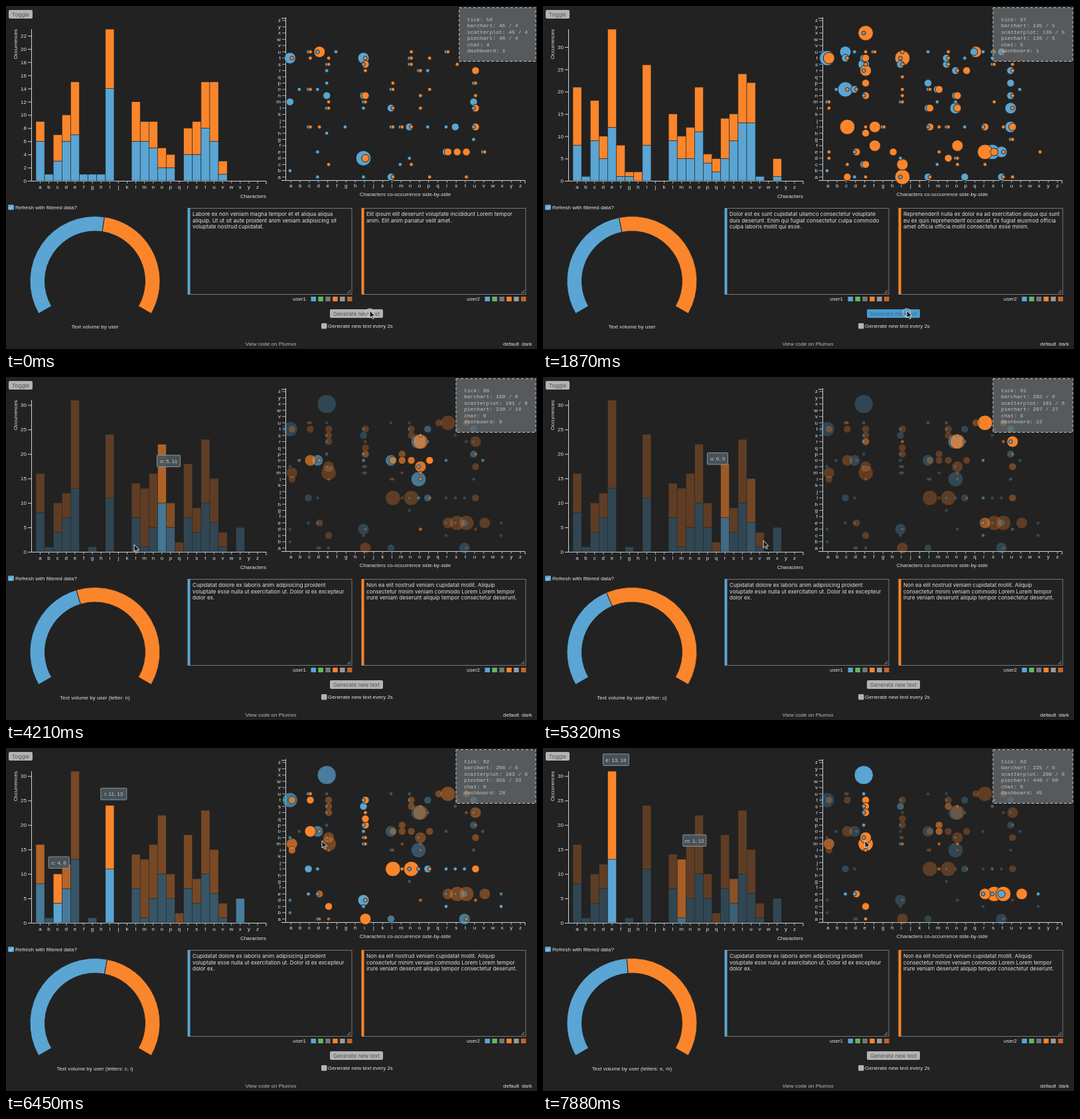
Recreate the animation shown at these times as an HTML page. Size 800 by 518 pixels, loop 8 s.

```html
<!DOCTYPE html>
<html lang="en">
<head>
<meta charset="utf-8">
<title>Text dashboard</title>
<style>
html, body { margin: 0; width: 100%; height: 100%; overflow: hidden; background: #222; }
svg { display: block; width: 800px; height: 518px; }
text { font: 8px "Liberation Sans", Arial, sans-serif; fill: #e2e2e2; white-space: pre; }
.wide { font: 8.1px Inter, sans-serif; }
.mono { font: 8px "Liberation Mono", monospace; fill: #c4c4c4; }
.mid { text-anchor: middle; }
.end { text-anchor: end; }
.axis { fill: none; stroke: #ccd3d6; }
</style>
</head>
<body>
<svg viewBox="0 0 800 518"><g id="still"></g><g id="live"></g></svg>
<script>
const LOOP = 8000, FADE = 750, DIM = 0.28;
const BG = '#222', COLORS = ['#5aa5d3', '#fb852b'];
const LETTERS = [...'abcdefghijklmnopqrstuvwxyz'];

const mix = (a, b, k) => a + (b - a) * k;
const ease = u => u <= 0 ? 0 : u >= 1 ? 1 : u < .5 ? 4 * u ** 3 : 1 - 4 * (1 - u) ** 3;
const index = letter => letter.charCodeAt(0) - 97;

// Value of interruptible eased transitions; only a new target restarts the ease.
function track(events, t, get) {
  let from = get(events[0]), to = from, start = events[0][0];
  for (const e of events) {
    if (e[0] > t) break;
    const next = get(e);
    if (next === to) continue;
    from = mix(from, to, ease((e[0] - start) / FADE));
    to = next;
    start = e[0];
  }
  return mix(from, to, ease((t - start) / FADE));
}

// Linear interpolation through [time, value, value...] points.
function along(points, t, col = 1) {
  const i = points.findIndex(p => p[0] > t);
  if (i < 0) return points[points.length - 1][col];
  if (!i) return points[0][col];
  const a = points[i - 1], b = points[i];
  return mix(a[col], b[col], (t - a[0]) / (b[0] - a[0]));
}

const text = (x, y, s, cls = '', more = '') => `<text x="${x}" y="${y}" class="${cls}" ${more}>${s}</text>`;
const rect = (x, y, w, h, fill, more = '') =>
  `<rect x="${x}" y="${y}" width="${w}" height="${h}" fill="${fill}" ${more}/>`;
const line = (d, more = '') => `<path class="axis" d="${d}" ${more}/>`;

// ---- data ----
const CHATS = [
  ['Labore ex non veniam magna tempor et et aliqua aliqua|aliquip. Ut ut sit aute proident anim veniam adipisicing sit|voluptate nostrud cupidatat.',
   'Elit ipsum elit deserunt voluptate incididunt Lorem tempor|anim. Elit anim pariatur velit amet.'],
  ['Dolor est ex sunt cupidatat ullamco consectetur voluptate|duis deserunt. Enim qui fugiat consectetur culpa commodo|culpa laboris mollit qui esse.',
   'Reprehenderit nulla ex dolor ea ad exercitation aliqua qui sunt|eu ex quis reprehenderit occaecat. Ex fugiat eiusmod officia|amet officia officia mollit consectetur esse minim.'],
  ['Cupidatat dolore ex laboris anim adipisicing proident|voluptate esse nulla ut exercitation ut. Dolor id ex excepteur|dolor ex.',
   'Non ea elit nostrud veniam cupidatat mollit. Aliquip|consectetur minim veniam commodo Lorem Lorem tempor|irure veniam deserunt aliquip tempor consectetur deserunt.'],
];

const add = (table, key) => { table[key] = (table[key] || 0) + 1; };
const parse = (s, size) => Object.fromEntries(
  s.split(' ').map(k => [k.slice(0, size), +k.slice(size) || 1]));

function analyse(chat) {
  const bars = [{}, {}], pairs = [{}, {}];
  chat.forEach((s, user) => {
    for (const word of s.toLowerCase().match(/[a-z]+/g))
      [...word].forEach((c, i) => {
        add(bars[user], c);
        if (i) add(pairs[user], word[i - 1] + c);
      });
  });
  return { bars, pairs };
}

const before = {
  bars: [
    parse('a6 b c3 d6 e7 f g h i14 l6 m6 n5 o2 p2 r4 s4 t8 u6 v', 1),
    parse('a3 c4 d4 e8 i9 l6 m3 n4 o3 p2 r4 s5 t7 u9 v2', 1)],
  pairs: [
    parse('ab am2 at3 bo ci co cu da de do du eh en2 ep er es el fu gi id4 ia il im in2 is it3 la2 ll2 li lo mc mi nd ni2 ns nt or pi pr re2 ri ru si2 ug ui ul um2 up ve', 2),
    parse('at ci co cu ct di du3 ec el em et es id2 in2 im ir is2 it la li ll lo lp mi nc ni nt ns nu or on ol pa po pt re2 ru se2 ss ta te2 ui2 ul2 un up ur2 ve', 2)],
};
const sets = [before, ...CHATS.map(analyse)];
const count = (set, user, letters) => [...letters].reduce((n, c) => n + (set.bars[user][c] || 0), 0);
const share = (set, letters = LETTERS) => {
  const a = count(set, 0, letters);
  return a / (a + count(set, 1, letters));
};
for (const s of sets) {
  s.max = Math.max(...LETTERS.map(c => count(s, 0, c) + count(s, 1, c)));
  s.step = s.max > 25 ? 5 : 2;
}
const last = sets[3];
const dots = [0, 1].flatMap(user =>
  [...new Set(sets.flatMap(s => Object.keys(s.pairs[user])))].map(pair => ({ user, pair })));

// ---- timeline ----
const updates = [0, 100, 1040, 2080].map((t, i) => [t, sets[i]]);

// [time, hovered letters, letters lit when they differ]
const hovers = [
  [0, ''], [3050, 'p'], [3750, 'o'], [4130, 'n'],
  [4250, 'l'], [4450, 'i'], [4560, 'l'], [4610, 'm'], [4660, 'o'], [4720, 'r'], [5080, 'u'],
  [5420, 'v'], [5490, 'x'], [5560, ''], [5985, 'ci', 'ciadx'], [6100, 'ci'],
  [6560, 'et'], [6780, 'ex'], [6950, 'eu'], [7140, 'es'], [7515, 'em'],
].map(([t, letters, lit = letters]) => [t, letters, lit]);

const pie = [
  ...updates.map(([t, set]) => [t, share(set)]),
  ...[[4150, 'n'], [4350, 'l'], [4750, 'u'], [5480, 'x'],
      [5985, 'ci'], [6480, 'ex'], [7660, 'em']].map(([t, s]) => [t, share(last, s)]),
];

const pointer = [
  [0, 548, 460], [2120, 548, 460], [2850, 478, 379], [3080, 300, 225], [3400, 247, 225],
  [3800, 234, 235], [4090, 222, 245], [4210, 193, 253], [4450, 158, 240], [4560, 185, 238],
  [4720, 265, 235], [5050, 285, 240], [5320, 332, 247], [5500, 352, 245], [5700, 400, 220],
  [5985, 456, 183], [6250, 458, 180], [6450, 476, 140], [6600, 485, 78], [6850, 486, 50],
  [7000, 486, 70], [7200, 486, 88], [7450, 485, 135], [7880, 485, 140],
];
const frames = [[100, 45], [860, 90], [1040, 90], [1800, 135], [2080, 135], [2830, 181]];
const dashboard = [[3050, 1], [4210, 9], [5320, 22], [6450, 28], [7880, 45]];
const scatterExtra = [[5900, 0], [6450, 2], [7880, 19]];
const pieExtra = [[3050, 0], [4210, 48], [5320, 115], [6450, 173], [7880, 258]];

// ---- layout ----
const BASE = 264, TOP = 35, HEIGHT = BASE - TOP;
const barX = c => 45 + 13.1 * index(c);
const dotX = c => 429.3 + 13.83 * index(c);
const dotY = c => 258.2 - 9.45 * index(c);

function drawStill() {
  let s = line(`M38.5 35V264.5H392V269`);
  s += line('M421.5 17V263.5H782V268M415 18.5H421M415 263.5H421');
  for (const c of LETTERS) {
    const x = barX(c) + 6.5;
    s += line(`M${x} 264V268M${dotX(c)} 263V267M416 ${dotY(c)}H421`, 'stroke-width=".8"');
    s += text(x, 276, c, 'mid') + text(dotX(c), 274, c, 'mid') + text(414, dotY(c) + 2.5, c, 'end');
  }
  s += text(17, 35, 'Occurrences', 'end', 'transform="rotate(-90 17 35)"');
  s += text(392, 290, 'Characters', 'end') + text(601.5, 287, 'Characters co-occurrence side-by-side', 'mid');
  s += rect(4, 6, 36, 13, '#b3b3b3', 'rx="2"') + text(22, 15.5, 'Toggle', 'wide mid', 'style="fill:#555"');
  s += rect(3, 300, 9, 8, COLORS[0], 'rx="1.5"') + line('M5 304L7 306L10.3 302', 'stroke-width="1.1"');
  s += text(14, 307, 'Refresh with filtered data?');
  s += rect(475, 479, 8.5, 8.5, '#b3b3b3', 'rx="1.5"') + text(485, 486, 'Generate new text every 2s');
  s += text(399, 513, 'View code on Plumvo', 'mid', 'style="fill:#bbb"');
  s += text(749, 513, 'default') + text(777, 513, 'dark');
  COLORS.forEach((color, user) => {
    const x = 274 + 262 * user;
    s += rect(x + .5, 305.5, 246.5, 130, 'none', 'stroke="#777"') + rect(x - .5, 305, 4, 130.5, color);
    s += line(`M${x + 240} 434L${x + 245} 429M${x + 243} 434L${x + 245} 432`, 'stroke-width=".7"');
    s += text(x + 178, 445, 'user' + (user + 1), 'end');
    [COLORS[0], '#5dba62', '#777', COLORS[1], '#999', '#c4642a'].forEach((fill, i) => {
      s += rect(x + 185.5 + 10.9 * i, 439, 7.5, 7, fill);
    });
  });
  return s;
}

function drawBars(t) {
  const max = track(updates, t, e => e[1].max);
  const y = v => BASE - HEIGHT * v / max;
  let s = '';
  for (let v = 0; v <= 35; v++) {
    const show = track(updates, t, ([, d]) => +(v <= d.max && v % d.step === 0));
    if (show > .01) s += `<g opacity="${show}">${line(`M33 ${y(v) + .5}H38`)}${text(31, y(v) + 3, v, 'end')}</g>`;
  }
  for (const c of LETTERS) {
    const [a, b] = [0, 1].map(u => track(updates, t, e => e[1].bars[u][c] || 0));
    const lit = track(hovers, t, e => !e[2] || e[2].includes(c) ? 1 : DIM);
    const more = `opacity="${lit}" stroke="${BG}" stroke-width=".6"`;
    if (a > 0) s += rect(barX(c), y(a), 13.1, BASE - y(a), COLORS[0], more);
    if (b > 0) s += rect(barX(c), y(a + b), 13.1, y(a) - y(a + b), COLORS[1], more);
  }
  return s;
}

function drawDots(t) {
  return dots
    .map(d => ({ ...d, r: 2.85 * track(updates, t, e => e[1].pairs[d.user][d.pair] || 0) }))
    .filter(d => d.r > .05)
    .sort((a, b) => b.r - a.r)
    .map(({ user, pair, r }) => {
      const lit = track(hovers, t, e => !e[2] || [...pair].some(c => e[2].includes(c)) ? 1 : DIM);
      const x = dotX(pair[0]) + (user ? 1.5 : -1.4);
      return `<circle cx="${x}" cy="${dotY(pair[1])}" r="${r}" fill="${COLORS[user]}" stroke="${BG}" opacity="${lit}"/>`;
    }).join('');
}

function drawPie(t, letters) {
  const split = 240 * track(pie, t, e => e[1]) - 120;
  const at = (r, deg) => {
    const a = deg * Math.PI / 180;
    return `${134 + r * Math.sin(a)} ${415.5 - r * Math.cos(a)}`;
  };
  const arc = (a, b, fill) => {
    const big = +(b - a > 180);
    return `<path fill="${fill}" stroke="${BG}" d="M${at(98, a)}A98 98 0 ${big} 1 ${at(98, b)}L${at(75.5, b)}A75.5 75.5 0 ${big} 0 ${at(75.5, a)}Z"/>`;
  };
  const note = letters && ` (letter${letters.length > 1 ? 's' : ''}: ${[...letters].join(', ')})`;
  return arc(-120, split, COLORS[0]) + arc(split, 120, COLORS[1]) +
    text(134, 487, 'Text volume by user' + note, 'mid');
}

function drawTips(t, letters) {
  const past = hovers.filter(e => e[0] <= t);
  return [...letters].map((c, k) => {
    let first = past.length - 1;
    while (first && past[first - 1][1][k]) first--;
    const run = past.slice(first);
    const [a, b] = [0, 1].map(u => count(last, u, c));
    const label = `${c}: ${a}, ${b}`, w = 3 + 4 * label.length;
    const x = track(run, t, e => barX(e[1][k]) - 7);
    const y = track(run, t, e => TOP - 26 + HEIGHT *
      (1 - (count(last, 0, e[1][k]) + count(last, 1, e[1][k])) / last.max));
    return rect(x, y, w, 17.5, '#4b565c', 'rx="1" stroke="#8b979d" fill-opacity=".93"') +
      text(x + w / 2, y + 11.5, label, 'mid', 'style="fill:#c5ced2"');
  }).join('');
}

function drawChat(t, round) {
  let s = CHATS[round].map((chat, user) => chat.split('|')
    .map((row, i) => text(281 + 262 * user, 317 + 9.6 * i, row, 'wide')).join('')).join('');
  const pressed = (t > 930 && t < 1040) || (t > 1780 && t < 2080);
  s += rect(488, 458, 80, 13, pressed ? '#4b9bcb' : '#b3b3b3', 'rx="2"');
  return s + text(528, 467.5, 'Generate new text', 'wide mid', `style="fill:${pressed ? '#2f6f98' : '#555'}"`);
}

function drawPanel(t, round) {
  const dash = Math.floor(along(dashboard, t)), n = 4 + round;
  const bars = Math.floor(along(frames, t));
  const rows = [
    `tick: ${56 + Math.max(0, Math.floor((t + 160) / 1060))}`,
    `barchart: ${bars + dash - 1} / ${n}`,
    `scatterplot: ${bars + Math.floor(along(scatterExtra, t))} / ${n}`,
    `piechart: ${bars + 1 + Math.floor(along(pieExtra, t))} / ${n + (dash > 1 ? dash - 1 : 0)}`,
    `chat: ${n}`,
    `dashboard: ${dash}`,
  ];
  const w = 4.8 * Math.max(...rows.map(r => r.length)) + 24, x = 798 - w;
  return rect(x, 2.5, w, 81, '#7d8488', 'fill-opacity=".57" stroke="#c8c8c8" stroke-dasharray="4 3"') +
    rows.map((r, i) => text(x + 12, 22.5 + 9.5 * i, r, 'mono')).join('');
}

function drawPointer(t) {
  const x = along(pointer, t, 1), y = along(pointer, t, 2);
  const at = `transform="translate(${x} ${y})"`;
  if (x > 274 && x < 521 && y > 305 && y < 435)
    return `<path ${at} fill="none" stroke="#999" d="M-3 0Q0 0 0 2Q0 0 3 0M0 2V9M-3 11Q0 11 0 9Q0 11 3 11M-1.5 6H1.5"/>`;
  const clicking = t < 200 || (t > 930 && t < 1150) || (t > 1780 && t < 2150);
  return (clicking ? `<circle cx="${x}" cy="${y + 3}" r="6" fill="none" stroke="#ddd"/>` : '') +
    `<path ${at} fill="#181818" stroke="#eee" stroke-width=".9" d="M0 0V11L2.6 8.6L4.4 12.6L6.2 11.8L4.4 8H7.8Z"/>`;
}

const live = document.getElementById('live');
document.getElementById('still').innerHTML = drawStill();

function draw(t) {
  const round = t < 1040 ? 0 : t < 2080 ? 1 : 2;
  const letters = hovers.filter(e => e[0] <= t).pop()[1];
  live.innerHTML = drawBars(t) + drawDots(t) + drawPie(t, letters) + drawChat(t, round) +
    drawTips(t, letters) + drawPanel(t, round) + drawPointer(t);
}

let began;
function tick(now) {
  began ??= now;
  draw((now - began) % LOOP);
  requestAnimationFrame(tick);
}
draw(0);
requestAnimationFrame(tick);
</script>
</body>
</html>
```
